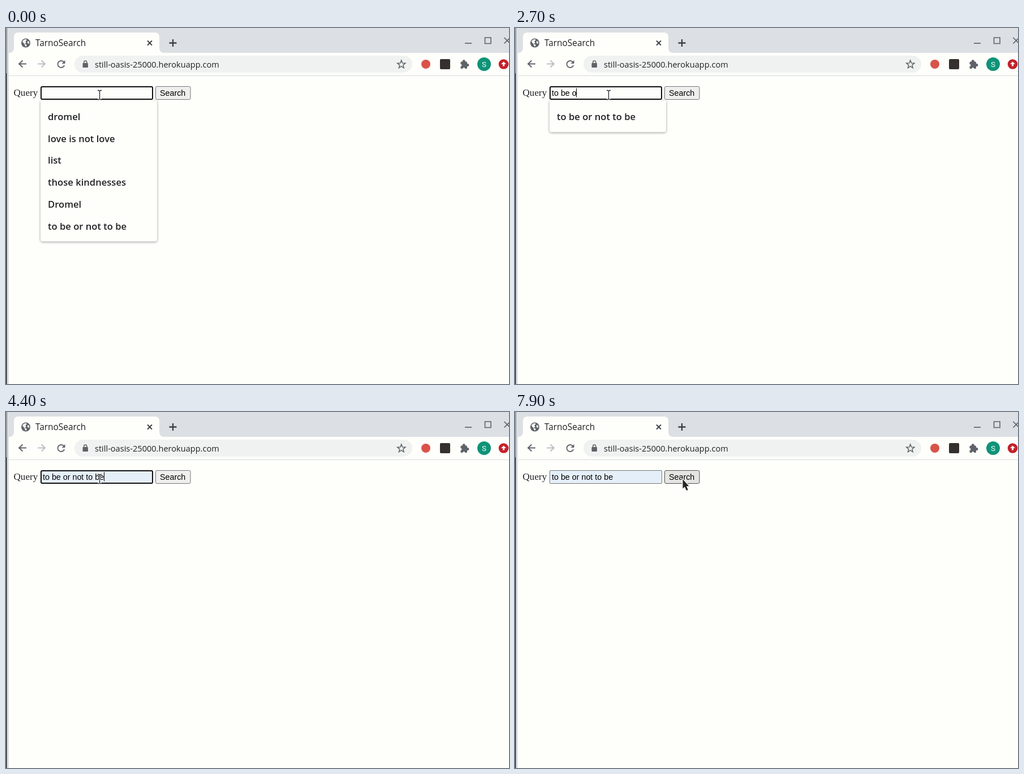
These frames come from a looping animation (889x630 px, 8 s). An HTML page with a canvas:

```html
<!DOCTYPE html>
<html lang="en">
<head>
<meta charset="utf-8">
<title>Search form</title>
<style>
html, body { margin: 0; width: 100%; height: 100%; overflow: hidden; background: #fefffb; }
canvas { display: block; }
</style>
</head>
<body>
<canvas id="stage" width="889" height="630"></canvas>
<script>
const ctx = document.getElementById('stage').getContext('2d');
const LOOP = 8000;
const PAGE = '#fefffb', INK = '#202124', GREY = '#5f6368';
const UI = '"Open Sans", "Noto Sans", sans-serif';
const FIELD = '14.3px "Liberation Sans", Arial, sans-serif';
const ITEM = '600 16.6px ' + UI;
const PHRASE = 'to be or not to be';
const HISTORY = ['dromel', 'love is not love', 'list', 'those kindnesses', 'Dromel', PHRASE];
const T_MATCHES = ['those kindnesses', PHRASE, 'there are more things in'];

// [start, typed text, suggestions]
const TYPING = [
  [0, '', HISTORY], [300, 't', T_MATCHES], [500, 'to', [PHRASE]], [600, 'to ', [PHRASE]],
  [700, 'to b', [PHRASE]], [800, 'to bv'], [900, 'to bve'], [1000, 'to bve '],
  [1400, 'to bve o'], [1700, 'to bve '], [1900, 'to bve'], [2100, 'to bv'],
  [2200, 'to b', [PHRASE]], [2300, 'to be', [PHRASE]], [2500, 'to be ', [PHRASE]],
  [2700, 'to be o', [PHRASE]], [2800, 'to be or', [PHRASE]], [2900, 'to be or ', [PHRASE]],
  [3000, 'to be or n', [PHRASE]], [3200, 'to be or no', [PHRASE]], [3300, 'to be or not', [PHRASE]],
  [3400, 'to be or not ', [PHRASE]], [4000, PHRASE, [PHRASE]], [4400, PHRASE]
];

function text(str, x, y, font, color = INK) {
  ctx.font = font;
  ctx.fillStyle = color;
  ctx.fillText(str, x, y);
}

function rect(x, y, w, h, color) {
  ctx.fillStyle = color;
  ctx.fillRect(x, y, w, h);
}

function round(x, y, w, h, r, fill, stroke, width = 1) {
  ctx.beginPath();
  ctx.roundRect(x, y, w, h, r);
  if (fill) { ctx.fillStyle = fill; ctx.fill(); }
  if (stroke) { ctx.strokeStyle = stroke; ctx.lineWidth = width; ctx.stroke(); }
}

function disc(x, y, r, color) {
  ctx.fillStyle = color;
  ctx.beginPath();
  ctx.arc(x, y, r, 0, Math.PI * 2);
  ctx.fill();
}

function stroke(path, color = GREY, width = 2) {
  ctx.strokeStyle = color;
  ctx.lineWidth = width;
  ctx.stroke(new Path2D(path));
}

function fill(path, color) {
  ctx.fillStyle = color;
  ctx.fill(new Path2D(path));
}

function drawTabs() {
  rect(0, 0, 889, 44, '#dcdfe3');
  fill('M5 44 Q14 44 14 35 V16 Q14 8 22 8 H263 Q271 8 271 16 V35 Q271 44 280 44 Z', PAGE);

  disc(35, 26.5, 8, GREY);
  fill('M29 24 Q31 20 35 20 L37 21 L34 24 L36 26 L33 28 L37 30 L35 33 Q33 31 33 29 Z', PAGE);
  fill('M38 23 L41 24 V28 L38 27 Z', PAGE);

  text('TarnoSearch', 52, 32, '15.4px ' + UI);
  stroke('M250 22.5 L258 30.5 M258 22.5 L250 30.5', '#3c4043', 1.9);
  stroke('M288.5 26.5 H301.5 M295 20 V33', '#3c4043', 2.3);
  stroke('M811 27 H823', GREY, 1.7);
  stroke('M846.5 17 H857 V27.5 H846.5 Z', GREY, 1.6);
  stroke('M880.5 17 L891 27.5 M891 17 L880.5 27.5', GREY, 1.7);
}

function drawStar(x, y, r) {
  ctx.beginPath();
  for (let i = 0; i < 10; i++) {
    const a = i * Math.PI / 5 - Math.PI / 2, d = i % 2 ? r * 0.43 : r;
    ctx.lineTo(x + d * Math.cos(a), y + d * Math.sin(a));
  }
  ctx.closePath();
  ctx.strokeStyle = GREY;
  ctx.lineWidth = 1.5;
  ctx.stroke();
}

function drawToolbar() {
  rect(5, 44, 884, 40, PAGE);
  rect(5, 84, 884, 1, '#d9dbdc');
  for (const [x, dir, color] of [[29, 1, GREY], [63, -1, '#bcbfc1']]) {
    ctx.save();
    ctx.translate(x, 63.5);
    ctx.scale(dir, 1);
    stroke('M7 0 H-6 M0.5 -6 L-6 0 L0.5 6', color, 1.9);
    ctx.restore();
  }
  ctx.strokeStyle = GREY;
  ctx.lineWidth = 1.9;
  ctx.beginPath();
  ctx.arc(97.5, 64, 6, 0.35, Math.PI * 1.78);
  ctx.stroke();
  fill('M104.5 57 V63 H98.5 Z', GREY);

  round(121, 49, 597, 30, 15, '#f0f2f1');
  round(135.5, 62, 9.5, 8, 1, GREY);
  stroke('M137.7 62 V60.5 Q137.7 58 140.2 58 Q142.7 58 142.7 60.5 V62', GREY, 1.5);
  text('still-oasis-25000.herokuapp.com', 157, 69.5, '14.57px ' + UI);
  drawStar(698.8, 64.6, 7.4);

  disc(742, 64, 8, '#d9534a');
  round(767, 55, 18, 18, 2, '#33302d');

  round(803.5, 59.5, 11.5, 12.5, 1.5, GREY);
  disc(809.3, 58.7, 2.5, GREY);
  disc(815.8, 65.5, 2.5, GREY);
  disc(803.5, 66, 2, PAGE);
  disc(809.3, 72, 2, PAGE);

  disc(845, 64, 12, '#109378');
  ctx.textAlign = 'center';
  text('S', 845, 69, '13.5px Roboto, sans-serif', '#fff');
  ctx.textAlign = 'left';

  disc(879.5, 64, 8.8, '#c5202a');
  fill('M879.5 59.5 L884 64 H881 V67.5 H878 V64 H875 Z', '#fff');
}

function drawEdge() {
  rect(0, 0, 1, 80, '#b9bcbf');
  rect(0, 80, 1, 550, '#2d2d2d');
  rect(1, 0, 1, 630, '#77797b');
  rect(2, 0, 3, 630, '#dcdfe3');
}

function drawPopup(items, active, alpha) {
  ctx.font = ITEM;
  const widest = Math.max(...items.map(s => ctx.measureText(s).width));
  const w = Math.max(206, widest + 26);
  const h = 17 + 38.7 * items.length;
  ctx.save();
  ctx.globalAlpha = alpha;
  ctx.shadowColor = 'rgba(0,0,0,.4)';
  ctx.shadowBlur = 4;
  ctx.shadowOffsetY = 1;
  round(61, 128.5, w, h, [0, 0, 4, 4], PAGE);
  ctx.shadowColor = 'transparent';
  if (active) rect(61, 137, w, 39, '#c5c5c4');
  items.forEach((s, i) => text(s, 74, 163 + 38.7 * i, ITEM));
  ctx.restore();
}

function drawForm(value, focused, filled, caret, hover) {
  text('Query', 13.5, 119.5, '17.1px "Liberation Serif", Times, serif');
  const color = filled ? '#e5eff9' : PAGE;
  if (focused) round(62, 104, 197, 22, 2, color, '#101010', 2);
  else round(61.5, 103.5, 198, 23, 1.5, color, '#767676');
  text(value, 65, 119.5, FIELD, '#000');
  if (caret) {
    const x = 65 + ctx.measureText(value).width;
    rect(Math.floor(x), 106.5, 1, 16, '#000');
  }
  round(264.5, 103.5, 61.5, 23, 2.5, hover ? '#e4e4e2' : '#efefee', hover ? '#505050' : '#767676');
  text('Search', 272, 119.5, FIELD, '#000');
}

function drawPointer(x, y, beam) {
  ctx.save();
  ctx.translate(x, y);
  if (beam) {
    const shape = 'M-3 -7.5 H-1 L0.5 -6.5 L2 -7.5 H4 M0.5 -6.5 V7.5 M-3 8.5 H-1 L0.5 7.5 L2 8.5 H4';
    stroke(shape, '#fff', 3);
    stroke(shape, '#222', 1.3);
  } else {
    const shape = 'M0.5 1 V17.5 L4 14.3 L7 21 L9.8 19.7 L7 13.3 H11.5 Z';
    ctx.lineJoin = 'round';
    stroke(shape, '#fff', 2.4);
    fill(shape, '#252525');
  }
  ctx.restore();
}

function caretShown(t) {
  if (t < 4000) return t >= 300;
  if (t < 4300 || t >= 7900) return false;
  return Math.floor((t - 4300) / 600) % 2 === 0;
}

function draw(time) {
  const t = Math.floor(time / 100) * 100;
  const [, value, items] = TYPING.findLast(step => step[0] <= t);

  // The pointer arcs over the field to the button.
  const p = Math.min(1, Math.max(0, (t - 7100) / 500));
  const x = 165 + 131 * p, y = 118 - 29 * Math.sin(Math.PI * p);
  const inside = y >= 103 && y <= 127;
  const hover = inside && x >= 264;

  rect(0, 0, 889, 630, PAGE);
  drawTabs();
  drawToolbar();
  drawEdge();
  if (items) drawPopup(items, t >= 4000 && t < 4300, t >= 4300 ? 0.4 : 1);
  drawForm(value, t < 7900, t >= 4000, caretShown(t), hover);
  drawPointer(x, y, inside && x < 259);
}

const start = performance.now();
function tick() {
  draw((performance.now() - start) % LOOP);
  requestAnimationFrame(tick);
}
tick();
</script>
</body>
</html>
```
